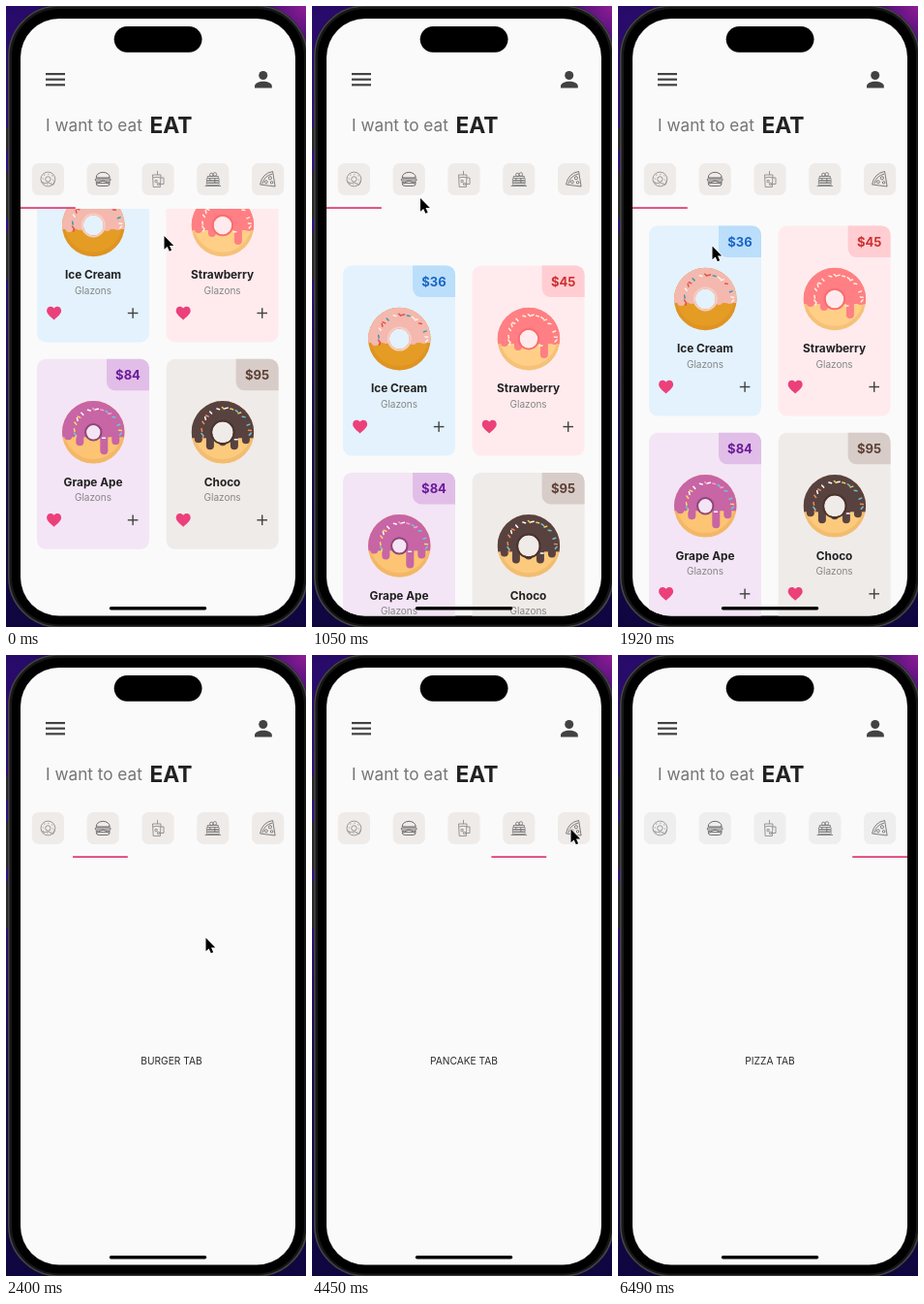
Animation of 310 by 640 pixels, one loop 6.59 s. Source, as an HTML page with a canvas:

```html
<!DOCTYPE html>
<html lang="en">
<head>
<meta charset="utf-8">
<title>Food app</title>
<style>
html, body { margin: 0; width: 100%; height: 100%; overflow: hidden; background: #000; }
canvas { display: block; width: 310px; height: 640px; }
</style>
</head>
<body>
<canvas></canvas>
<script>
const W = 310, H = 640, LOOP = 6590, TAU = Math.PI * 2;
const SCREEN = { x: 15, y: 13, w: 284, h: 615.6 };
const TAB_W = SCREEN.w / 5, LIST_TOP = 209, REST_TOP = 226;
const SCROLL_TICK = 146, SWIPE_TICK = 240;
const PINK = '#ec407a', DARK = '#424242', INK = '#212121';

const canvas = document.querySelector('canvas');
const dpr = window.devicePixelRatio || 1;
canvas.width = W * dpr;
canvas.height = H * dpr;
const g = canvas.getContext('2d');

// Motion

const clamp = u => Math.min(1, Math.max(0, u));
const smooth = u => u * u * (3 - 2 * u);
const mix = (a, b, u) => a + (b - a) * u;

// A flick that fades out, a pull past the top edge, then a spring back to rest.
function cardsTop(time) {
  const t = Math.floor(time / SCROLL_TICK) * SCROLL_TICK;
  if (t < 290) return 150.5;
  if (t < 1020) return 201 - 19.5 * Math.exp((290 - t) / 140) + 67 * clamp((t - 770) / 250);
  return REST_TOP + 42 * Math.exp((1020 - t) / 200);
}

// Each coarse step of a swipe leaves only a small part of the way.
function swipe(t, start) {
  return t < start ? 0 : 1 - .7 * .07 ** Math.floor((t - start) / SWIPE_TICK);
}

const tap = (t, start) => (t < start ? 0 : 1);
const tabAt = t => swipe(t, 2160) + swipe(t, 3020) + tap(t, 3860) + tap(t, 5340);

const CURSOR = [
  { t: 0, x: 163.5, y: 237 },
  { t: 440, x: 179.5, y: 287.5 },
  { t: 1050, x: 112, y: 198 },
  { t: 1660, x: 97.5, y: 247.5 },
  { t: 1920, x: 97.5, y: 247.5 },
  { t: 2400, x: 206.5, y: 291.5 },
  { t: 3690, x: 211, y: 187 },
  { t: 4450, x: 267.5, y: 179.5 },
  { t: 5600, x: 264.5, y: 175 },
  { t: 6030, x: 285, y: 645 }
];

function cursorAt(t) {
  const next = CURSOR.findIndex(k => k.t > t);
  if (next < 0) return CURSOR[CURSOR.length - 1];
  const a = CURSOR[next - 1], b = CURSOR[next], u = smooth((t - a.t) / (b.t - a.t));
  return { x: mix(a.x, b.x, u), y: mix(a.y, b.y, u) };
}

// Drawing helpers

function box(x, y, w, h, r, fill) {
  g.beginPath();
  g.roundRect(x, y, w, h, r);
  if (fill) { g.fillStyle = fill; g.fill(); }
}

function circle(x, y, r) {
  g.beginPath();
  g.arc(x, y, r, 0, TAU);
  g.stroke();
}

function line(x1, y1, x2, y2) {
  g.beginPath();
  g.moveTo(x1, y1);
  g.lineTo(x2, y2);
  g.stroke();
}

function outline(path) {
  g.stroke(new Path2D(path));
}

function frame(x, y, w, h, r) {
  box(x, y, w, h, r);
  g.stroke();
}

function text(str, x, y, font, fill, align = 'center') {
  g.font = font + ' Inter, Roboto, sans-serif';
  g.fillStyle = fill;
  g.textAlign = align;
  g.fillText(str, x, y);
}

function at(x, y, draw, scale = 1) {
  g.save();
  g.translate(x, y);
  g.scale(scale, scale);
  draw();
  g.restore();
}

const HEART = new Path2D('M0 9C-7 3-10 0-10-3.6C-10-10-3-11 0-7C3-11 10-10 10-3.6C10 0 7 3 0 9Z');
const ARROW = new Path2D('M0 0V16L3.7 12.8 6.2 18.4 8.9 17.2 6.4 11.7H11.4Z');

// Tab icons, centred on 0,0

function donutIcon() {
  circle(0, 0, 7.4);
  circle(0, 0, 2.7);
  for (let i = 0; i < 8; i++) {
    const a = i * TAU / 8, r = 4.8 + i % 2 * .6;
    line(r * Math.cos(a), r * Math.sin(a), (r + .6) * Math.cos(a + .2), (r + .6) * Math.sin(a + .2));
  }
  outline('M-6.6 2Q-4 6-2 4T3 5 6.6 2');
}

function burgerIcon() {
  outline('M-7-1.5C-7-9 7-9 7-1.5Z');
  box(-8, -.5, 16, 2, 1);
  g.stroke();
  outline('M-7.5 2.6Q-5 4.5-2.5 2.6T2.5 2.6 7.5 2.6');
  outline('M-7 4.2H7Q7 7 4 7H-4Q-7 7-7 4.2');
}

function drinkIcon() {
  outline('M-5.5-4.5H3L2.4 8H-4.8ZM3-1.5H6V5H2.6M-5-1.5Q-1-3 3-1.5M-.5-4.5V-8.5');
  frame(-3, 1, 2.2, 2.2, .3);
  frame(-.5, 4, 2, 2, .3);
}

function pancakeIcon() {
  for (let i = 0; i < 3; i++) frame(-6.5, -1 + i * 2.4, 13, 2.4, 1);
  line(-8.2, 7, 8.2, 7);
  outline('M-5.5-1V-3H5.5V-1M-3-1V1.5M2-1V4');
  circle(-1.5, -4.6, 1.7);
  circle(2, -5, 1.8);
}

function pizzaIcon() {
  outline('M-8 5.5Q-6-6 5-8L7.5 7.5ZM-5.6 4.8Q-4-3.5 4.6-5.4');
  circle(2.3, -1.2, 1.6);
  circle(-1.8, 2.8, 1.5);
  circle(4, 3.4, 1.3);
}

const ICONS = [
  { draw: donutIcon, color: '#858585' },
  { draw: burgerIcon, color: '#4c4c4c' },
  { draw: drinkIcon, color: '#828282' },
  { draw: pancakeIcon, color: '#6d6d6d' },
  { draw: pizzaIcon, color: '#606060' }
];

// Cards: the icing ends at `base`, and `drips` are {x: lowest point}.

const CARDS = [
  { name: 'Ice Cream', price: '$36', bg: '#e3f2fd', tag: '#bbdefb', ink: '#1b67c4',
    dough: '#e59c24', icing: '#f4b8ae', rim: '#f8cdc4', hole: 10.5, base: 4,
    drips: { '-25': 7, '-14': 5, 14: 6, 25: 5 }, sprinkles: ['#2f9fb0', '#e0524d', '#fff3e6'] },
  { name: 'Strawberry', price: '$45', bg: '#ffebee', tag: '#ffcdd2', ink: '#cf2f2f',
    dough: '#ffcf87', icing: '#ff7f84', rim: '#f96d74', hole: 9.3, base: 5,
    drips: { '-25': 8, '-11': 12, 0: 9, 16: 20, 27: 6 }, sprinkles: ['#fff0dc'] },
  { name: 'Grape Ape', price: '$84', bg: '#f3e5f5', tag: '#e1bee7', ink: '#6a1b9a',
    dough: '#fcc473', icing: '#c765a5', rim: '#8c477d', hole: 7.2, base: 5,
    drips: { '-26': 8, '-14': 14, 0: 7, 11: 23, 23: 13 }, sprinkles: ['#fff', '#ffd95e', '#65c9d0', '#f7a2c8'] },
  { name: 'Choco', price: '$95', bg: '#efebe9', tag: '#d7ccc8', ink: '#5d4037',
    dough: '#fcca7d', icing: '#584240', rim: '#49332f', hole: 10.8, base: 6,
    drips: { '-25': 11, '-13': 18, 0: 14, 12: 18, 24: 12 }, sprinkles: ['#fff', '#f18a54', '#6cc4d1', '#ead05d'] }
];

function sprinkle(c, R) {
  g.lineWidth = 1.5;
  for (let i = 0; i < 30; i++) {
    const a = i * 2.4 + .5, r = mix(c.hole + 5, R - 3, i * .382 % 1);
    const x = r * Math.cos(a), y = r * Math.sin(a);
    if (y > c.base + 2) continue;
    const dx = 1.4 * Math.cos(i * 1.9), dy = 1.4 * Math.sin(i * 1.9);
    g.strokeStyle = c.sprinkles[i % c.sprinkles.length];
    line(x - dx, y - dy, x + dx, y + dy);
  }
}

function donut(c) {
  const R = 32.3;
  g.beginPath();
  g.arc(0, 0, R, 0, TAU);
  g.arc(0, 0, c.hole, TAU, 0, true);
  g.fillStyle = c.dough;
  g.fill();
  g.clip();
  g.strokeStyle = 'rgba(180,95,20,.12)';
  g.lineWidth = 5;
  circle(0, -2, R);
  g.fillStyle = g.strokeStyle = c.icing;
  g.fillRect(-R, -R, 2 * R, R + c.base);
  g.lineCap = 'round';
  g.lineWidth = 8;
  for (const x in c.drips) line(+x, 0, +x, c.drips[x] - 4);
  g.strokeStyle = c.rim;
  g.lineWidth = 2;
  circle(0, 0, c.hole + 1);
  sprinkle(c, R);
}

function card(c) {
  box(0, 0, 116, 196, 9, c.bg);
  box(72, 0, 44, 32.5, [0, 9, 0, 9], c.tag);
  text(c.price, 94, 21, 'bold 13px', c.ink);
  at(58.3, 75.5, () => donut(c));
  text(c.name, 58, 130.7, 'bold 11.8px', INK);
  text('Glazons', 58, 146, '10px', '#858585');
  g.fillStyle = PINK;
  at(17.6, 166.2, () => g.fill(HEART), .75);
  g.fillStyle = DARK;
  g.fillRect(93.8, 165.3, 10.6, 1.4);
  g.fillRect(98.4, 160.7, 1.4, 10.6);
}

function phone() {
  const wall = g.createLinearGradient(0, 0, 0, H);
  ['#270a68', '#380f8c', '#170850', '#0f0640'].forEach((c, i) => wall.addColorStop(i / 3, c));
  g.fillStyle = wall;
  g.fillRect(0, 0, W, H);
  const glow = g.createRadialGradient(W, 0, 0, W, 0, 70);
  glow.addColorStop(0, '#8f1d95');
  glow.addColorStop(1, 'rgba(100,20,130,0)');
  g.fillStyle = glow;
  g.fillRect(W - 80, 0, 80, 80);
  box(0, 125, 4, 24, 1, '#29292b');
  box(0, 171, 4, 49, 1, '#29292b');
  box(0, 233, 4, 49, 1, '#29292b');
  box(1.8, -1, 310.4, 642, 53, '#171718');
  box(2.8, 0, 308.4, 640, 52);
  g.lineWidth = 1.6;
  g.strokeStyle = '#444447';
  g.stroke();
  box(6, 3, 302, 634.5, 49, '#000');
}

function header(tab, tile) {
  g.fillStyle = DARK;
  for (let i = 0; i < 3; i++) g.fillRect(41, 69 + i * 5.6, 20, 2.2);
  box(261.2, 67, 9, 9, 4.5, DARK);
  g.fill(new Path2D('M257 84.6v-2c0-6.4 17.8-6.4 17.8 0v2z'));
  text('I want to eat', 41, 129, '17.2px', '#757575', 'left');
  text('EAT', 148.5, 131, 'bold 22.8px', INK, 'left');
  ICONS.forEach((icon, i) => {
    const x = SCREEN.x + TAB_W * (i + .5);
    box(x - 16.6, 162, 33.2, 33, 7, tile);
    g.lineWidth = .8;
    g.strokeStyle = icon.color;
    at(x, 178.5, icon.draw);
  });
  g.fillStyle = '#e0437c';
  g.fillRect(SCREEN.x + TAB_W * tab, 207.2, TAB_W, 1.8);
}

function pages(top, tab) {
  g.save();
  g.beginPath();
  g.rect(SCREEN.x, LIST_TOP, SCREEN.w, H);
  g.clip();
  CARDS.forEach((c, i) => {
    at(32 + i % 2 * 133.6 - SCREEN.w * tab, top + (i >> 1) * 213.3, () => card(c));
  });
  ['BURGER', 'SMOOTHIE', 'PANCAKE', 'PIZZA'].forEach((name, i) => {
    text(name + ' TAB', 157 + SCREEN.w * (i + 1 - tab), 422, '10.2px', '#2a2a2a');
  });
  g.restore();
}

function cursor({ x, y }) {
  at(x, y, () => {
    g.lineJoin = 'round';
    g.lineWidth = 1.8;
    g.strokeStyle = '#fff';
    g.stroke(ARROW);
    g.fillStyle = '#000';
    g.fill(ARROW);
  }, .86);
}

function render(t) {
  const tab = tabAt(t);
  g.setTransform(dpr, 0, 0, dpr, 0, 0);
  phone();
  g.save();
  box(SCREEN.x, SCREEN.y, SCREEN.w, SCREEN.h, 40, '#fafafa');
  g.clip();
  pages(cardsTop(t), tab);
  header(tab, t >= 6210 ? '#eeeeee' : '#efebe9');
  box(106.8, 619, 100.5, 3.6, 1.8, '#000');
  g.restore();
  box(111.7, 21, 90.8, 26.7, 13.35, '#000');
  cursor(cursorAt(t));
}

const start = performance.now();
function tick() {
  render((performance.now() - start) % LOOP);
  requestAnimationFrame(tick);
}
tick();
</script>
</body>
</html>
```
